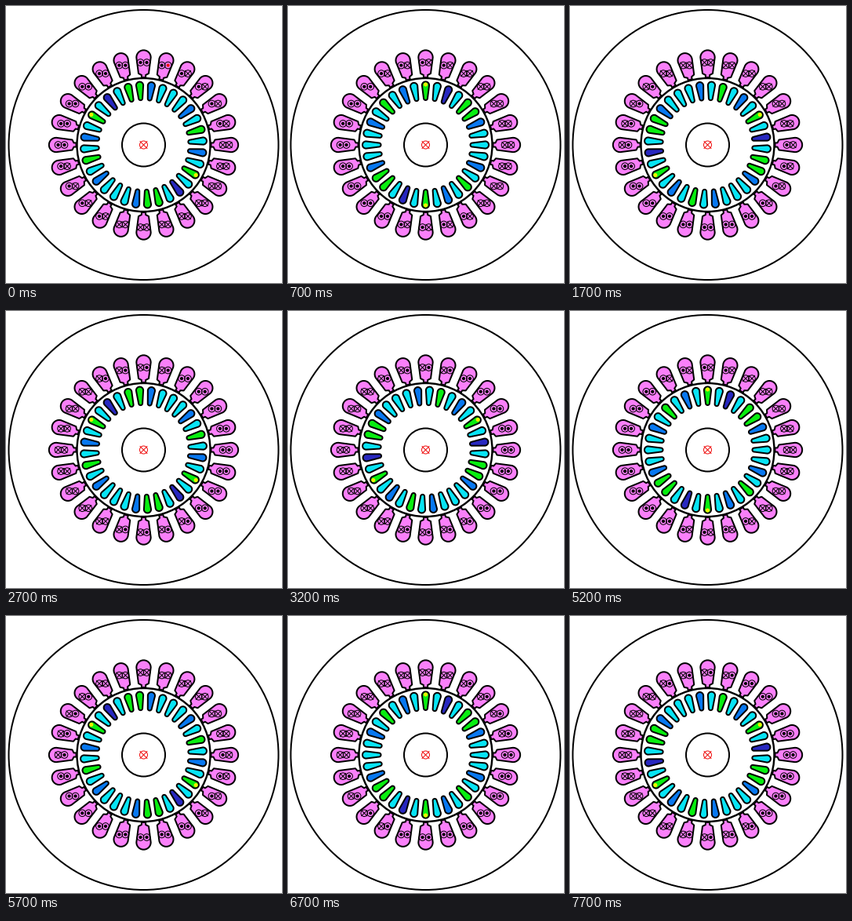
Recreate the animation shown at these times as a matplotlib script. Size 352 by 353 pixels, loop 8 s.

```python
import numpy as np
import matplotlib.pyplot as plt
from matplotlib.animation import FuncAnimation
from matplotlib.collections import LineCollection, PolyCollection
from matplotlib.patches import Circle

W, H, DPI = 352, 353, 100
PX = 72 / DPI                      # one pixel in points
CX, CY = 175.5, 177
STEP, FIRST = 500, 200             # ms per pose, ms of the opening pose
INTERVAL, LOOP = 100, 8000

SLOTS, BARS = 24, 32
SYM_R, SYM_GAP, SYM_RING = 4.3, 4.0, 105

PINK = "#fa80fa"
CYAN, BLUE, NAVY, GREEN = "#08e4f4", "#0878f0", "#2828c0", "#08ee10"
YELLOW, RED = "#f0f000", "#f01010"
# Bar colours clockwise over half a turn, from the hottest bar
BAR_COLORS = [GREEN, CYAN, NAVY, CYAN, GREEN, GREEN, BLUE, CYAN,
              CYAN, CYAN, BLUE, CYAN, GREEN, CYAN, BLUE, CYAN] * 2


def place(points, deg):
    """Turn (across, outward) points clockwise from the top onto the stage."""
    a = np.radians(deg)
    u, r = np.asarray(points, float).T
    return np.column_stack([CX + r * np.sin(a) + u * np.cos(a),
                            CY - r * np.cos(a) + u * np.sin(a)])


def arc(r, radius, start, end, n=14):
    t = np.radians(np.linspace(start, end, n))
    return [(radius * np.cos(v), r + radius * np.sin(v)) for v in t]


def ring(x, y, r, width, color="black", z=5):
    ax.add_patch(Circle((x, y), r, fill=False, ec=color, lw=width * PX, zorder=z))


def cross(x, y, s):
    return [[(x - s, y - s), (x + s, y + s)], [(x - s, y + s), (x + s, y - s)]]


SLOT = (arc(111.5, 9.2, 0, 180) + [(-6.5, 91), (-2.6, 89), (-2.6, 86)]
        + [(2.6, 86), (2.6, 89), (6.5, 91)])
BAR = arc(76, 4.6, 0, 180) + arc(59.5, 2.5, 180, 360)
TIP = arc(77, 2.6, 0, 360)

fig = plt.figure(figsize=(W / DPI, H / DPI), dpi=DPI, facecolor="white")
ax = fig.add_axes([0, 0, 1, 1])
ax.set_xlim(0, W)
ax.set_ylim(H, 0)
ax.axis("off")

ring(CX, CY, 172, 2)
ring(CX, CY, 85, 2.4)
ring(CX, CY, 27.5, 2)
ring(CX, CY, 5, 1, RED)
ax.add_collection(LineCollection(cross(CX, CY, 4.8), colors=RED, lw=PX))

slot_angles = np.arange(SLOTS) * 360 / SLOTS
ax.add_collection(PolyCollection([place(SLOT, a) for a in slot_angles],
                                 fc=PINK, ec="black", lw=2 * PX, zorder=2))
centers = np.array([place([(0, SYM_RING)], a)[0] for a in slot_angles])
sites = np.stack([centers - (SYM_GAP, 0), centers + (SYM_GAP, 0)], axis=1)
for x, y in sites.reshape(-1, 2):
    ring(x, y, SYM_R, 1)

bars = PolyCollection([], ec="black", lw=2 * PX, zorder=3)
tips = PolyCollection([], fc=YELLOW, ec="none", zorder=4)
crosses = LineCollection([], colors="black", lw=PX, zorder=6)
for coll in (bars, tips, crosses):
    ax.add_collection(coll)
dots = ax.scatter([], [], s=(4.2 * PX) ** 2, lw=0, zorder=7)


def inward(slot, side, state):
    """True where the current of a layer flows into the page."""
    lead_side = 1 if (slot + 2) % SLOTS < 8 else 0
    lag = 0 if side == lead_side else 4
    return (slot - 2 + 4 * state - lag) % SLOTS < SLOTS // 2


def draw(frame):
    t = frame * INTERVAL
    pose = 0 if t < FIRST else (t - FIRST) // STEP + 1

    start = 120 - 60 * (pose % 3)
    angles = start + np.arange(BARS) * 360 / BARS
    bars.set_verts([place(BAR, a) for a in angles])
    bars.set_facecolor(BAR_COLORS)
    tips.set_verts([place(TIP, start), place(TIP, start + 180)])

    phase = pose % 9
    state = 2 * phase // 3
    lines, spots, colors = [], [], []
    for slot in range(SLOTS):
        for side in (0, 1):
            x, y = sites[slot, side]
            if inward(slot, side, state):
                lines += cross(x, y, SYM_R * 0.9)
            else:
                spots.append((x, y))
                hot = phase == 0 and (slot, side) == (1, 1)
                colors.append(RED if hot else "black")
    crosses.set_segments(lines)
    dots.set_offsets(spots)
    dots.set_facecolor(colors)
    return bars, tips, crosses, dots


anim = FuncAnimation(fig, draw, frames=LOOP // INTERVAL, interval=INTERVAL,
                     repeat=True, repeat_delay=0, blit=False)
plt.show()
```
